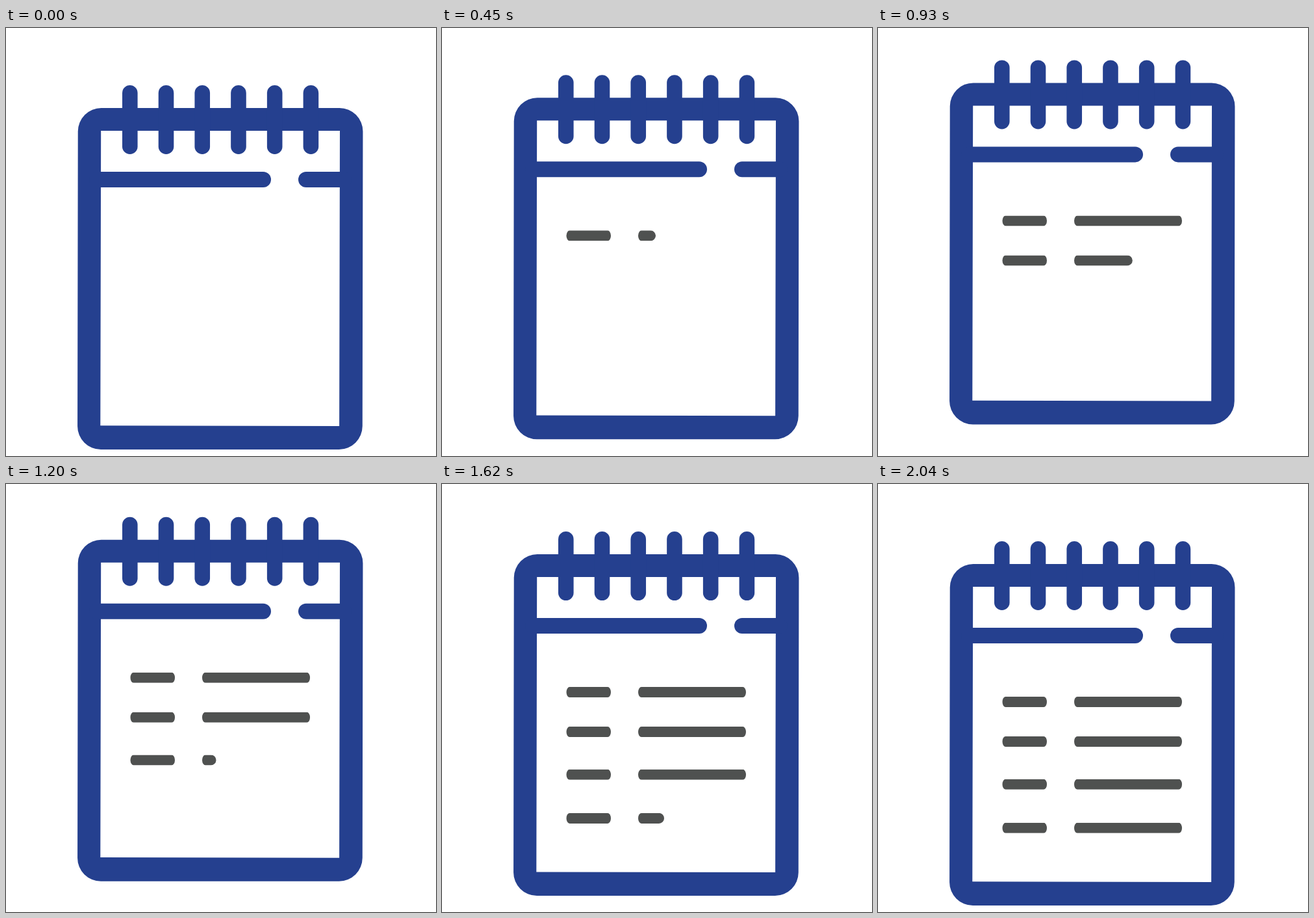
Animation of 662 by 658 pixels, one loop 2.37 s. Source, as an HTML page with a canvas:

```html
<!DOCTYPE html>
<html lang="en">
<head>
<meta charset="utf-8">
<title>Notepad</title>
<style>
html, body { margin: 0; width: 100%; height: 100%; overflow: hidden; background: #fff; }
canvas { display: block; }
</style>
</head>
<body>
<canvas id="stage" width="662" height="658"></canvas>
<script>
const ctx = document.getElementById('stage').getContext('2d');
const LOOP = 2370, STEP = 30, END = 2040, PEAK = 1040, LIFT = 39.7;
const BLUE = '#25408f', GREY = '#4f5150';
const SHORT = { x: 191.5, w: 68.5 }, LONG = { x: 302, w: 166 };
const ROWS = [335, 396, 461.7, 528.8];

// [time, total length written so far]
const WRITING = [[240, 0], [400, 68.5], [450, 95.5], [720, 263.5], [1200, 559],
                 [1440, 732], [1800, 892], [1930, 938]];

const ease = p => (1 - Math.cos(Math.PI * p)) / 2;

function lift(t) {
  return -LIFT * (t < PEAK ? ease(t / PEAK) : ease((END - t) / (END - PEAK)));
}

function written(t) {
  if (t <= WRITING[0][0]) return 0;
  for (let i = 1; i < WRITING.length; i++) {
    const [t0, a] = WRITING[i - 1], [t1, b] = WRITING[i];
    if (t < t1) return a + (b - a) * (t - t0) / (t1 - t0);
  }
  return WRITING[WRITING.length - 1][1];
}

function line(x0, y0, x1, y1, width) {
  ctx.lineWidth = width;
  ctx.beginPath();
  ctx.moveTo(x0, y0);
  ctx.lineTo(x1, y1);
  ctx.stroke();
}

function pad() {
  ctx.fillStyle = ctx.strokeStyle = BLUE;
  ctx.lineCap = 'round';

  // Border, narrowing very slightly to the left as it goes down
  ctx.beginPath();
  ctx.moveTo(330, 123);
  ctx.arcTo(549.5, 123, 548.7, 648, 36);
  ctx.arcTo(548.7, 648, 110, 648, 36);
  ctx.arcTo(110, 648, 110.8, 123, 36);
  ctx.arcTo(110.8, 123, 330, 123, 36);
  ctx.closePath();
  ctx.moveTo(146.2, 158);
  ctx.lineTo(514, 158);
  ctx.lineTo(513.1, 612);
  ctx.lineTo(145.3, 611.3);
  ctx.closePath();
  ctx.fill('evenodd');

  for (let i = 0; i < 6; i++) {
    const x = 190.8 + i * 55.72;
    line(x, 99.8, x, 182.2, 23.6);
  }
  line(140, 233, 396, 233, 24);
  line(462, 233, 520, 233, 24);
}

function dash(part, y, len) {
  if (len <= 0) return;
  ctx.save();
  ctx.beginPath();
  ctx.roundRect(part.x, y - 8, part.w, 16, { x: 5, y: 8 });
  ctx.clip();
  ctx.fillStyle = GREY;
  ctx.beginPath();
  const extra = len >= part.w ? 10 : 0;
  ctx.roundRect(part.x - 20, y - 8, 20 + Math.min(len, part.w) + extra, 16, 8);
  ctx.fill();
  ctx.restore();
}

function draw(time) {
  const t = Math.min(END, Math.floor((time % LOOP) / STEP) * STEP);
  ctx.fillStyle = '#fff';
  ctx.fillRect(0, 0, 662, 658);
  ctx.save();
  ctx.translate(0, lift(t));
  pad();
  let left = written(t);
  for (const y of ROWS) {
    for (const part of [SHORT, LONG]) {
      dash(part, y, left);
      left -= part.w;
    }
  }
  ctx.restore();
}

const start = performance.now();
function tick() {
  draw(performance.now() - start);
  requestAnimationFrame(tick);
}
tick();
</script>
</body>
</html>
```
